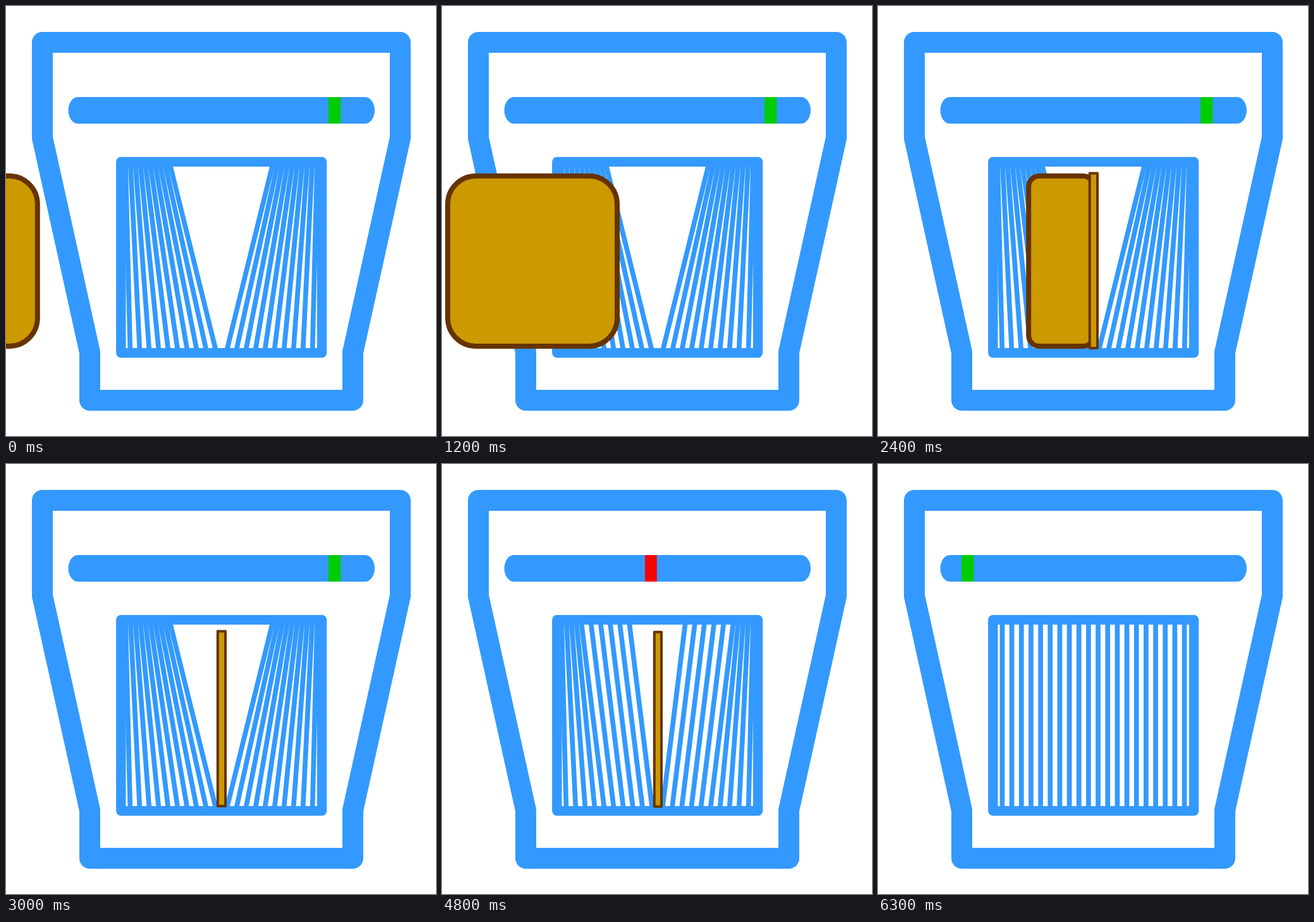
Recreate the animation shown at these times as an HTML page. Size 680 by 680 pixels, loop 6.6 s.

```html
<!DOCTYPE html>
<html lang="en">
<head>
<meta charset="utf-8">
<title>Slot and slats</title>
<style>
  html, body { margin: 0; width: 100%; height: 100%; overflow: hidden; background: #fff; }
  svg { display: block; width: 100%; height: 100%; }
  .blue { fill: none; stroke: #3399ff; stroke-linejoin: round; }
  .toast { fill: #cc9900; stroke: #663300; stroke-linejoin: round; }
</style>
</head>
<body>
<svg viewBox="0 0 680 680">
  <path class="blue" stroke-width="33" d="M57.5 57.5H623.5V208.5L548.5 547.5V623.5H132.5V547.5L57.5 208.5Z"/>
  <rect x="98.5" y="144" width="484.5" height="42" rx="15" ry="21" fill="#3399ff"/>
  <rect id="mark" y="144" width="19.4" height="42"/>
  <path id="slats" class="blue" stroke-width="7.7"/>
  <rect class="blue" x="181.8" y="246.4" width="317.8" height="302.2" stroke-width="15.4"/>
  <rect id="bread" class="toast" y="268.7" height="269.3" stroke-width="8"/>
  <rect id="slice" class="toast" stroke-width="4"/>
</svg>
<script>
const STEP = 300, STEPS = 22;
const SLOT = 341, WIDTH = 268, TRAVEL = 56.8;
const MID = 340.5, GAP = 15.16, LEAN = 7.45, PAIRS = 10;

const el = id => document.getElementById(id);
const mark = el('mark'), slats = el('slats'), bread = el('bread'), slice = el('slice');

function set(node, attrs) {
  for (const name in attrs) node.setAttribute(name, attrs[name]);
}

function show(node, on) {
  node.style.display = on ? '' : 'none';
}

// The slats straighten from the middle outwards.
function slatPath(k) {
  let d = '';
  for (let i = 0; i < PAIRS; i++) {
    const foot = (PAIRS - 0.5 - i) * GAP;
    const head = foot + LEAN * Math.min(i + 1, STEPS - 1 - k);
    for (const side of [-1, 1])
      d += `M${MID + side * head} 247L${MID + side * foot} 549`;
  }
  return d;
}

// The bread slides in at full width, then narrows against the slot.
function drawBread(k) {
  show(bread, k < 10);
  if (k >= 10) return;
  const x = k < 5 ? 9 + (k - 4) * TRAVEL : 67.8 + (k - 5) * TRAVEL;
  const width = Math.min(WIDTH, SLOT - x);
  set(bread, { x, width, rx: width / 6 });
}

function drawSlice(k) {
  show(slice, k >= 5 && k < STEPS - 1);
  set(slice, k < 11
    ? { x: 334.8, y: 264.6, width: 12.2, height: 276.4 }
    : { x: 335.8, y: 265.8, width: 11.2, height: 276 });
}

function draw(k) {
  const moving = k >= 11 && k < STEPS - 1;
  set(mark, {
    x: 510 - 37.8 * Math.max(0, k - 11),
    width: moving ? 18.8 : 19.4,
    fill: moving ? '#ff0000' : '#00cc00'
  });
  set(slats, { d: slatPath(k) });
  drawBread(k);
  drawSlice(k);
}

let last = -1;
const start = performance.now();

function tick() {
  const k = Math.floor((performance.now() - start) / STEP) % STEPS;
  if (k !== last) draw(last = k);
  requestAnimationFrame(tick);
}
tick();
</script>
</body>
</html>
```
